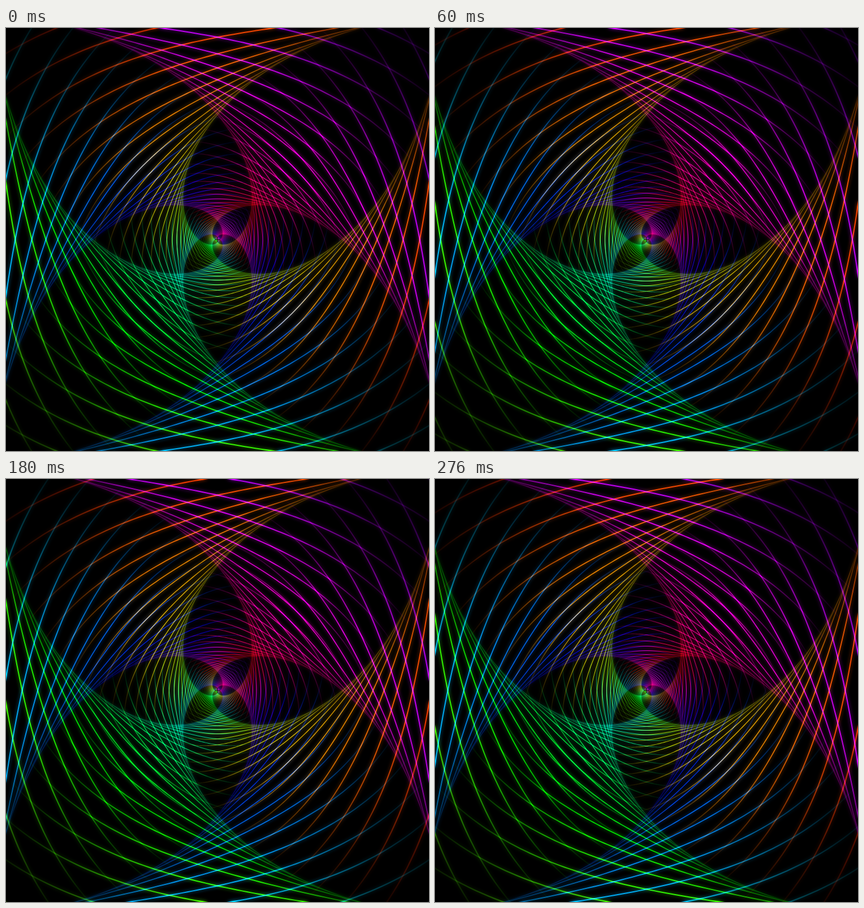
Recreate the animation shown at these times as an HTML page with a canvas. Size 748 px wide and 748 px high, loop 300 ms.

```html
<!DOCTYPE html>
<html>
<head>
<meta charset="utf-8">
<title>Spiral weave</title>
<style>
html, body { margin: 0; width: 100%; height: 100%; overflow: hidden; background: #000; }
canvas { display: block; }
</style>
</head>
<body>
<canvas id="stage" width="748" height="748"></canvas>
<script>
const SIZE = 748, MID = SIZE / 2, PAD = 12;
const POSES = 5, POSE_MS = 60;
const RAD = Math.PI / 180;
const TURN = 5 * RAD;             // rotation per step
const GROWTH = -Math.log(0.9);    // log of the scale per step
const HUE_STEP = 4;
const FIRST = -54, LAST = 5;      // steps from the centre to beyond the corners
const FROM = 38, TO = 160;        // angular extent of one strand, degrees

// opacity along a strand: [degrees, alpha]
const FADE = [[FROM, 0], [46, 0.1], [54, 0.28], [64, 0.58], [76, 0.78], [104, 0.78],
              [124, 0.55], [140, 0.26], [TO, 0]];

function makeCanvas(size) {
  const canvas = document.createElement('canvas');
  canvas.width = canvas.height = size;
  return canvas;
}

function strandPath() {
  const path = new Path2D();
  for (let deg = FROM; deg <= TO; deg += 1.5) {
    const x = (deg - 110) * RAD;
    const r = Math.exp(5.75 + x * x * (0.328 - 0.092 * x - 0.02 * x ** 3));
    path.lineTo(r * Math.cos(deg * RAD), r * Math.sin(deg * RAD));
  }
  return path;
}

function strandPaint(ctx, hue) {
  const paint = ctx.createConicGradient(0, 0, 0);
  for (const [deg, alpha] of FADE) {
    paint.addColorStop(deg / 360, `hsla(${hue}, 100%, 50%, ${alpha})`);
  }
  return paint;
}

const strand = strandPath();

function drawStrands(phase) {
  const canvas = makeCanvas(SIZE);
  const ctx = canvas.getContext('2d');
  ctx.fillRect(0, 0, SIZE, SIZE);
  ctx.globalCompositeOperation = 'lighter';
  for (let n = FIRST; n <= LAST; n++) {
    const step = n + phase;
    const scale = Math.exp(GROWTH * step);
    ctx.lineWidth = 1.9 * scale ** -0.4;   // thins more slowly than the strand shrinks
    for (let arm = 0; arm < 4; arm++) {
      const hue = (21 - HUE_STEP * step + 90 * arm + 720) % 360;
      ctx.strokeStyle = strandPaint(ctx, hue);
      for (const mirrored of [false, true]) {
        ctx.setTransform(1, 0, 0, -1, MID, MID);
        if (mirrored) ctx.transform(0, 1, 1, 0, 0, 0);
        ctx.rotate(arm * Math.PI / 2 - TURN * step);
        ctx.scale(scale, scale);
        ctx.stroke(strand);
      }
    }
  }
  return canvas;
}

// Repeats the border pixels outward so the glow gathers at the edges.
function extendEdges(source) {
  const canvas = makeCanvas(SIZE + 2 * PAD);
  const ctx = canvas.getContext('2d');
  const end = SIZE + PAD;
  ctx.drawImage(source, PAD, PAD);
  ctx.drawImage(source, 0, 0, SIZE, 1, PAD, 0, SIZE, PAD);
  ctx.drawImage(source, 0, SIZE - 1, SIZE, 1, PAD, end, SIZE, PAD);
  ctx.drawImage(source, 0, 0, 1, SIZE, 0, PAD, PAD, SIZE);
  ctx.drawImage(source, SIZE - 1, 0, 1, SIZE, end, PAD, PAD, SIZE);
  return canvas;
}

function renderPose(index) {
  const lines = drawStrands(index / POSES);
  const canvas = makeCanvas(SIZE);
  const ctx = canvas.getContext('2d');
  ctx.drawImage(lines, 0, 0);
  ctx.globalCompositeOperation = 'lighter';
  ctx.filter = 'blur(3px)';
  ctx.globalAlpha = 0.9;
  ctx.drawImage(extendEdges(lines), -PAD, -PAD);
  return canvas;
}

const poses = Array.from({ length: POSES }, (_, i) => renderPose(i));
const stage = document.getElementById('stage').getContext('2d');

function show(now) {
  stage.drawImage(poses[Math.floor(now / POSE_MS) % POSES], 0, 0);
  requestAnimationFrame(show);
}
show(0);
</script>
</body>
</html>
```
